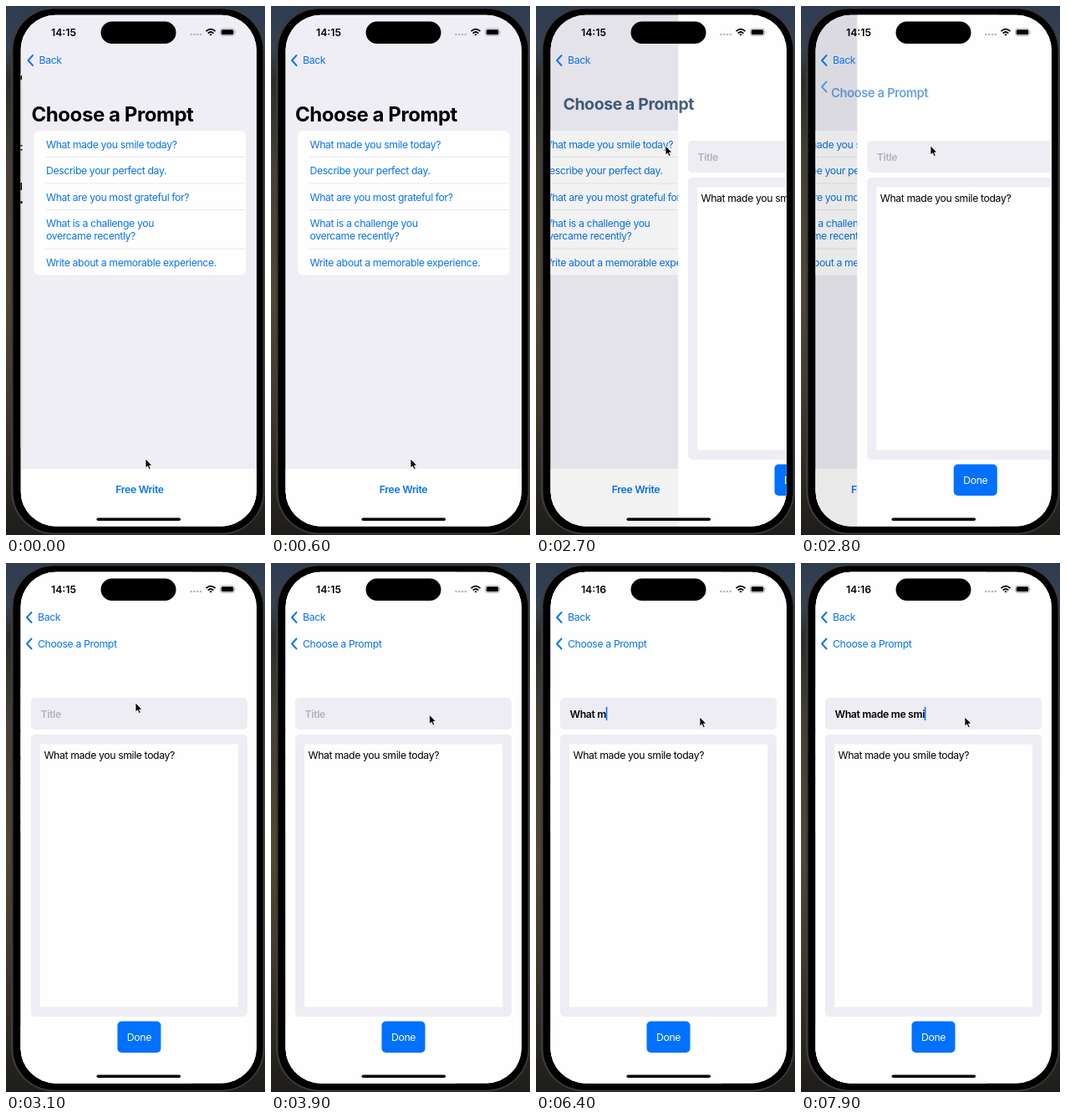
Recreate the animation shown at these times as an HTML page. Size 310 by 632 pixels, loop 8000 ms.

```html
<!DOCTYPE html>
<html lang="en">
<head>
<meta charset="utf-8">
<title>Journal prompt</title>
<style>
  html, body { margin: 0; width: 100%; height: 100%; overflow: hidden; background: #222; }
  svg { display: block; width: 310px; height: 632px; }
  text { font: 12.24px Inter, "Liberation Sans", sans-serif; letter-spacing: -.03em; white-space: pre; }
  .semi { font-weight: 600; letter-spacing: -.026em; }
  .big { font-size: 24px; font-weight: 700; letter-spacing: -.018em; }
  .mid { text-anchor: middle; }
  .blue { fill: #0a74ea; }
  .chev { fill: none; stroke: #0a74ea; stroke-width: 1.9; stroke-linecap: round; stroke-linejoin: round; }
</style>
</head>
<body>
<svg viewBox="0 0 310 632">
  <defs>
    <linearGradient id="photo" x2="0" y2="1">
      <stop offset="0" stop-color="#2f3b4f"/>
      <stop offset=".08" stop-color="#364253"/>
      <stop offset=".14" stop-color="#2c2d29"/>
      <stop offset=".3" stop-color="#454032"/>
      <stop offset=".55" stop-color="#544733"/>
      <stop offset=".75" stop-color="#43392b"/>
      <stop offset="1" stop-color="#1e1d1a"/>
    </linearGradient>
    <clipPath id="screen"><rect x="17.500" y="10.800" width="282.300" height="610.600" rx="42"/></clipPath>
  </defs>

  <rect width="310" height="632" fill="url(#photo)"/>
  <rect x="6" y="1.500" width="303.500" height="630" rx="52" fill="#3b3b3d"/>
  <rect x="8.500" y="3.500" width="299" height="626" rx="49" fill="#000"/>

  <g clip-path="url(#screen)">
    <rect width="310" height="632" fill="#f4f2f4"/>
    <g id="list">
      <rect x="17" width="290" height="632" fill="#efeef4"/>
      <rect x="32" y="149" width="253.500" height="172.500" rx="6" fill="#fefefe"/>
      <path d="M46 180.500H285M46 212H285M46 243.500H285M46 290H285" stroke="#e2e2e6" stroke-width=".8"/>
      <g class="blue">
        <text x="46.500" y="169.500">What made you smile today?</text>
        <text x="46.500" y="201">Describe your perfect day.</text>
        <text x="46.500" y="232.500">What are you most grateful for?</text>
        <text x="46.500" y="263.500">What is a challenge you</text>
        <text x="46.500" y="279">overcame recently?</text>
        <text x="46.500" y="310.500">Write about a memorable experience.</text>
      </g>
      <rect x="17" y="553" width="290" height="80" fill="#fefefe"/>
      <text class="semi blue mid" x="158.500" y="582">Free Write</text>
      <rect id="dim" x="17" width="290" height="632"/>
    </g>

    <g id="editor">
      <rect x="17" width="283" height="632" fill="#fefefe"/>
      <g fill="#eeedf3">
        <rect x="29" y="161" width="259" height="38" rx="5"/>
        <rect x="29" y="205" width="259" height="337" rx="5"/>
      </g>
      <rect x="40" y="216.500" width="237" height="314" fill="#fefefe"/>
      <text x="44.500" y="234">What made you smile today?</text>
      <text id="hint" class="semi" x="40.500" y="184.500" fill="#b4b3b9">Title</text>
      <text id="typed" class="semi" x="40.500" y="184.500"></text>
      <rect id="caret" y="172" width="1.600" height="16" fill="#0a74ff"/>
      <rect x="132.500" y="547.500" width="52" height="37.500" rx="5" fill="#0070ff"/>
      <text class="mid" x="158.500" y="571" fill="#fff">Done</text>
    </g>

    <g id="nav">
      <path class="chev" d="M30.500 59L25 65L30.500 71"/>
      <text class="blue" x="38" y="69">Back</text>
      <path id="chev2" class="chev" d="M30.500 90.500L25 96.500L30.500 102.500"/>
      <text id="large" class="big" y="8.700">Choose a Prompt</text>
      <text id="small" class="blue" y="4.400">Choose a Prompt</text>
    </g>

    <g id="strip">
      <rect x="17" y="80" width="3" height="448" fill="#e9e2d8"/>
      <path d="M17 83h2v5h-2zM17 166h2.500v1.500h-2.500zM17 171h2.500v1.500h-2.500zM17 211h2v9h-2zM17 233h2.500v3h-2.500z"/>
    </g>

    <text id="clock" class="mid" x="69" y="35.500" style="font-weight:600;letter-spacing:0"></text>
    <g fill="#b7b7bc">
      <circle cx="221.500" cy="34" r="1.300"/><circle cx="225.300" cy="34" r="1.300"/>
      <circle cx="229.100" cy="34" r="1.300"/><circle cx="232.900" cy="34" r="1.300"/>
    </g>
    <g fill="none" stroke="#000" stroke-width="1.800">
      <path d="M239.500 30.200Q245 25 250.500 30.200M241.700 32.600Q245 29.400 248.300 32.600"/>
      <path d="M243.300 33.900Q245 32.600 246.700 33.900L245 35.600Z" fill="#000" stroke="none"/>
    </g>
    <rect x="256.500" y="27" width="17" height="8.500" rx="2.600" fill="none" stroke="#a5a5aa" stroke-width=".8"/>
    <rect x="257.700" y="28.200" width="14.600" height="6.100" rx="1.600"/>
    <path d="M274.600 29.800q1.600 1.500 0 3z" fill="#a5a5aa"/>
    <rect x="108.500" y="611.500" width="100.500" height="3.500" rx="1.750"/>
  </g>
  <rect x="113.500" y="18.500" width="90" height="26.500" rx="13.250"/>
  <path id="cursor" d="M0 0V11L2.500 8.700L4.300 12.600L6.200 11.800L4.500 8H7.900Z" stroke="#fff" stroke-width=".8"/>
</svg>
<script>
const $ = id => document.getElementById(id);
const clamp = (v, lo, hi) => Math.min(hi, Math.max(lo, v));
const mix = (a, b, k) => a + (b - a) * k;
const put = (id, name, value) => $(id).setAttribute(name, value);
const move = (id, x, y = 0, s = 1) => put(id, 'transform', `translate(${x} ${y}) scale(${s})`);

const WIDTH = 283, TITLE = 'What made me smi';
const pointer = [
  [0, 167, 541], [800, 167, 541], [1500, 168, 170], [1600, 168, 170], [1700, 168, 184],
  [1900, 144, 196], [2000, 144, 196], [2400, 155, 167], [3600, 155, 167], [4000, 196, 184], [8000, 196, 184]
];

// Share of a push transition still to go, ms after it starts (critically damped spring)
function remaining(ms) {
  const k = Math.max(0, ms) * .016;
  return Math.exp(-k) * (1 + k);
}

function pointerAt(t) {
  const i = pointer.findIndex(p => p[0] > t);
  const [a, b] = [pointer[i - 1], pointer[i]];
  const k = (t - a[0]) / (b[0] - a[0]), e = k * k * (3 - 2 * k);
  return [mix(a[1], b[1], e), mix(a[2], b[2], e)];
}

function caretOpacity(t) {
  if (t < 4400) return 0;
  if (t < 5100) return 1;
  if (t < 5200) return .4;
  if (t < 5400) return 0;
  return t < 5500 ? .5 : 1;
}

function draw(t) {
  const entry = WIDTH * remaining(t + 460);
  const left = remaining(t - 2603), p = 1 - left;

  move('list', entry - .3 * WIDTH * p);
  move('nav', entry);
  put('strip', 'opacity', clamp(entry / 1.5, 0, 1));
  put('dim', 'opacity', .1 * p);
  move('editor', WIDTH * left);

  // The large title shrinks into the back button's label
  const q = p ** 1.25, x = mix(29, 38, q), y = mix(129.3, 96.2, q), s = mix(1, 95 / 193, q);
  move('large', x, y, s);
  move('small', x, y, s * 193 / 95);
  put('large', 'opacity', Math.sqrt(left) * (1 - p ** 4));
  put('large', 'fill', `rgb(0 ${60 * p} ${130 * p})`);
  put('small', 'opacity', p ** 3);
  put('chev2', 'opacity', clamp(2 * p - 1, 0, 1));

  const n = t / 100;
  const count = clamp(n - 56, 0, 4) + clamp(n - 62, 0, 6) + clamp(n - 70, 0, 6);
  $('typed').textContent = TITLE.slice(0, count);
  put('hint', 'opacity', count ? 0 : 1);
  put('caret', 'x', 40.2 + (count ? $('typed').getComputedTextLength() : 0));
  put('caret', 'opacity', caretOpacity(t));

  $('clock').textContent = t < 6300 ? '14:15' : '14:16';
  move('cursor', ...pointerAt(t));
}

const start = performance.now();
function tick() {
  const t = (performance.now() - start) % 8000;
  draw(Math.floor(t / 100) * 100);
  requestAnimationFrame(tick);
}
tick();
</script>
</body>
</html>
```
